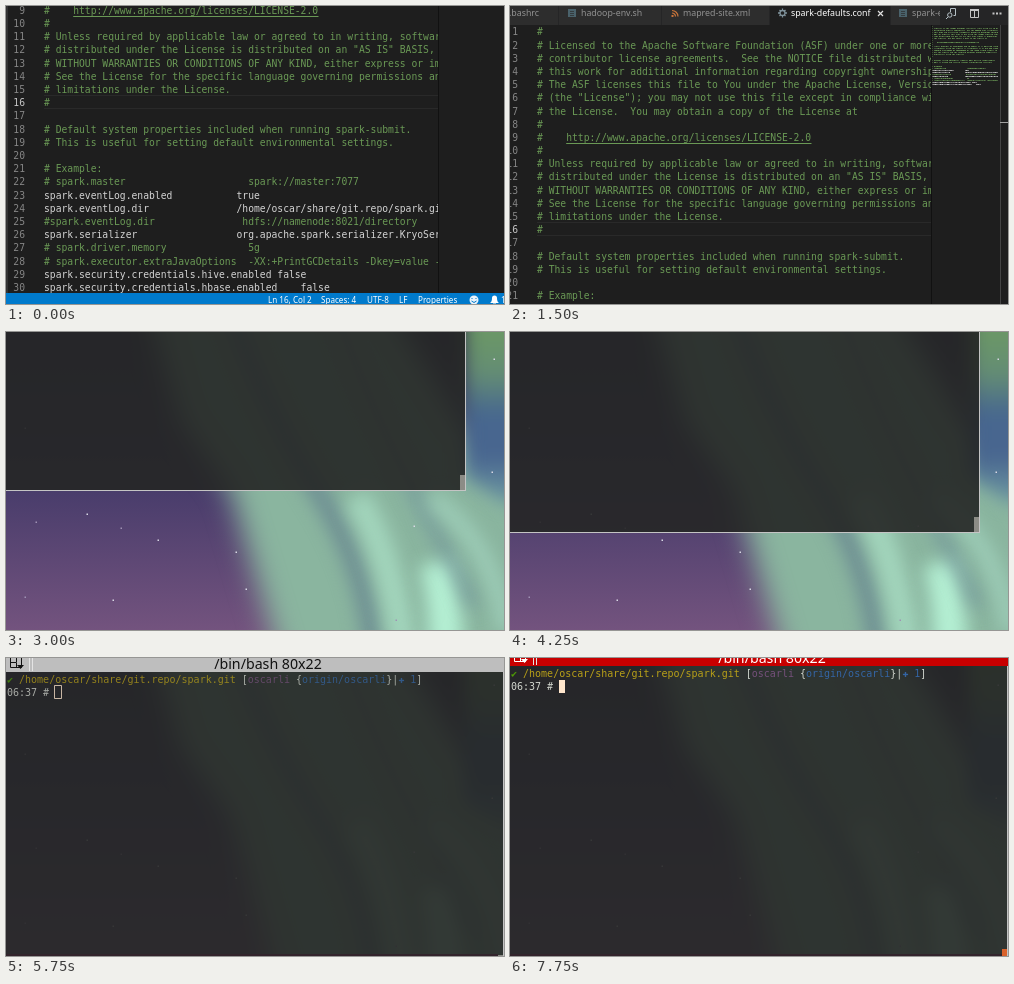
Recreate the animation shown at these times as an HTML page with a canvas. Size 498x298 px, loop 8000 ms.

```html
<!DOCTYPE html>
<html lang="en">
<head>
<meta charset="utf-8">
<title>Desktop</title>
<style>
html, body { margin: 0; width: 100%; height: 100%; overflow: hidden; background: #1e1e1e; }
canvas { display: block; }
</style>
</head>
<body>
<canvas id="stage" width="498" height="298"></canvas>
<script>
const W = 498, H = 298, STEP = 250, LOOP = 8000;
const MONO = '"DejaVu Sans Mono", monospace', SANS = '"Noto Sans", sans-serif';
const GREEN = '#6a9955', ROW = 13.19, CHAR = 5.84;
let ctx = document.getElementById('stage').getContext('2d');

const at = (key, value, col) => key.padEnd(col) + value;
const lines = [
  '#',
  '# Licensed to the Apache Software Foundation (ASF) under one or more',
  '# contributor license agreements.  See the NOTICE file distributed with',
  '# this work for additional information regarding copyright ownership.',
  '# The ASF licenses this file to You under the Apache License, Version 2.0',
  '# (the "License"); you may not use this file except in compliance with',
  '# the License.  You may obtain a copy of the License at',
  '#',
  '#    http://www.apache.org/licenses/LICENSE-2.0',
  '#',
  '# Unless required by applicable law or agreed to in writing, software',
  '# distributed under the License is distributed on an "AS IS" BASIS,',
  '# WITHOUT WARRANTIES OR CONDITIONS OF ANY KIND, either express or implied.',
  '# See the License for the specific language governing permissions and',
  '# limitations under the License.',
  '#',
  '',
  '# Default system properties included when running spark-submit.',
  '# This is useful for setting default environmental settings.',
  '',
  '# Example:',
  at('# spark.master', 'spark://master:7077', 35),
  at('spark.eventLog.enabled', 'true', 33),
  at('spark.eventLog.dir', '/home/oscar/share/git.repo/spark.git', 33),
  at('#spark.eventLog.dir', 'hdfs://namenode:8021/directory', 34),
  at('spark.serializer', 'org.apache.spark.serializer.KryoSerializer', 33),
  at('# spark.driver.memory', '5g', 35),
  at('# spark.executor.extraJavaOptions', '-XX:+PrintGCDetails -Dkey=value -Dnumbers="one two three"', 35),
  'spark.security.credentials.hive.enabled false',
  'spark.security.credentials.hbase.enabled    false'
];
const lineColor = s => s[0] === '#' ? GREEN : '#d4d4d4';

function rect(x, y, w, h, color) {
  ctx.fillStyle = color;
  ctx.fillRect(x, y, w, h);
}
function text(s, x, y, color, size, family = SANS, align = 'left') {
  ctx.font = `${size}px ${family}`;
  ctx.textAlign = align;
  ctx.fillStyle = color;
  ctx.fillText(s, x, y);
}
function path(d, color, width = 1) {
  ctx.strokeStyle = color;
  ctx.lineWidth = width;
  ctx.stroke(new Path2D(d));
}
function shape(d, color) {
  ctx.fillStyle = color;
  ctx.fill(new Path2D(d));
}
function fade(y0, y1, ...colors) {
  const g = ctx.createLinearGradient(0, y0, 0, y1);
  colors.forEach((c, i) => g.addColorStop(i / (colors.length - 1), c));
  return g;
}
function layer(w, h, draw) {
  const c = document.createElement('canvas'), main = ctx;
  c.width = w;
  c.height = h;
  ctx = c.getContext('2d');
  draw();
  ctx = main;
  return c;
}

const wallpaper = layer(W, H, () => {
  rect(0, 0, W, H, fade(0, H, '#2f2a4e', '#463b6a', '#73537e'));
  ctx.filter = 'blur(14px)';
  shape('M140-30 175 90 224 158 278 340H540V160L455 90 380-30Z', '#8ab59f');
  ctx.filter = 'blur(9px)';
  path('M225-20Q260 80 312 160T368 330', '#6c8c92', 18);
  path('M350 165Q385 220 398 320', '#a3d6bd', 26);
  path('M430 230Q440 265 440 320', '#b4efd3', 34);
  path('M330-20Q370 90 415 172T468 275', '#74989b', 11);
  path('M425 165Q490 215 500 300', '#9fcfba', 16);
  shape('M458-30H540V165L500 172 458 145Z', fade(0, 165, '#6b9766', '#648d74', '#47678f', '#48658f', '#6a94a0'));
  ctx.filter = 'none';
  const stars = [[81, 182], [230, 220], [240, 257], [107, 268], [152, 208], [408, 194],
    [488, 27], [486, 140], [19, 96], [30, 190], [19, 265], [390, 288], [115, 196]];
  stars.forEach(([x, y], i) => rect(x - .5, y - .5, 1.5, 1.5, i < 8 ? '#d8d8e4' : '#9f92b4'));
});

function fileIcon(x) {
  rect(x - 4, 34, 8, 8, '#4a626b');
  path(`M${x - 2} 36.500h4m-4 2h4m-4 2h4`, '#2d2d2d', .7);
}

function drawEditor(x, y, caret) {
  ctx.save();
  ctx.translate(x, y);
  rect(-57, 5, 555, 456, '#1e1e1e');
  rect(-57, 26, 48, 420, '#333333');

  // title bar
  rect(-57, 5, 555, 21, '#3a3a3a');
  text('Debug', 11, 18.3, '#d4d4d4', 8.7);
  text('Terminal', 49, 18.3, '#d4d4d4', 8.7);
  text('Help', 96, 18.3, '#d4d4d4', 8.7);
  text('spark-defaults.conf - share - Pretty Editor Desk [Superuser]', 271, 18.3, '#d4d4d4', 8.7, SANS, 'center');
  path('M415.500 15.500h7M447.500 12.500h7v7h-7zM477.500 12l7 7m0-7-7 7', '#d0d0d0');

  // tabs
  rect(-9, 26, 507, 24, '#252526');
  rect(-9, 26, 57, 24, '#2d2d2d');
  rect(49, 26, 102, 24, '#2d2d2d');
  rect(152, 26, 107, 24, '#2d2d2d');
  rect(260, 26, 120, 24, '#1e1e1e');
  rect(381, 26, 49, 24, '#2d2d2d');
  text('.bashrc', -1, 41, '#929292', 8.8);
  fileIcon(62);
  text('hadoop-env.sh', 71, 41, '#929292', 8.8);
  path('M162 35.500a6 6 0 0 1 6 6M162 38a3.500 3.500 0 0 1 3.500 3.500', '#c8743a', 1.2);
  rect(161.5, 40, 2, 2, '#c8743a');
  text('mapred-site.xml', 173, 41, '#929292', 8.8);
  path('M275 38a2.500 2.500 0 1 1-5 0 2.500 2.500 0 1 1 5 0M272.500 33.500v2m0 5v2M268 38h2m5 0h2M269.500 35l1 1m4 4 1 1m0-6-1 1m-4 4-1 1', '#7f929b', 1.3);
  text('spark-defaults.conf', 281, 41, '#ffffff', 8.8);
  path('M368 36l5 5m0-5-5 5', '#e0e0e0', 1.2);
  fileIcon(393);
  ctx.save();
  ctx.beginPath();
  ctx.rect(381, 26, 49, 24);
  ctx.clip();
  text('spark-env.sh', 402, 41, '#929292', 8.8);
  ctx.restore();
  path('M440.500 37v-3.500h5v7h-2M442 40a2.200 2.200 0 1 1-4.400 0 2.200 2.200 0 1 1 4.400 0M438 42l-2 2', '#b5c0c5');
  path('M460.500 34.500h8v8h-8zM464.500 34v8', '#c5c5c5');
  rect(460, 34, 9, 2, '#c5c5c5');
  for (let i = 0; i < 3; i++) rect(482.5 + i * 3.5, 37.5, 2, 2, '#c5c5c5');

  // text area
  const cur = 247;
  rect(27, cur, 394, 1, '#292929');
  rect(27, cur + 13, 394, 1, '#292929');
  ctx.save();
  ctx.beginPath();
  ctx.rect(-9, 50, 430, 395);
  ctx.clip();
  lines.forEach((s, i) => {
    const base = Math.round(60.4 + i * ROW);
    text(i + 1, 8, base, i === 15 ? '#c6c6c6' : '#858585', 9.7, MONO, 'right');
    text(s, 27, base, lineColor(s), 9.7, MONO);
  });
  rect(27 + 5 * CHAR, 168, 42 * CHAR, 1, GREEN);
  if (caret) rect(32, 248, 1, 13, '#d0d0c8');
  ctx.restore();

  // minimap and ruler
  rect(421, 50, 1, 395, '#111111');
  lines.forEach((s, i) => {
    for (let c = 0; c < Math.min(s.length, 66); c++) {
      if (s[c] === ' ') continue;
      ctx.globalAlpha = .4 + s.charCodeAt(c) % 5 * .12;
      rect(422 + c, 51 + i * 2, 1, 1, lineColor(s));
    }
  });
  ctx.globalAlpha = 1;
  rect(490, 50, 1, 395, '#444444');
  rect(490, 147, 8, 1, '#a0a0a0');

  // status bar
  rect(-57, 445, 555, 16, '#007acc');
  [['Ln 16, Col 2', 251], ['Spaces: 4', 304], ['UTF-8', 350], ['LF', 382], ['Properties', 401], ['1', 484]]
    .forEach(([s, left]) => text(s, left, 455, '#ffffff', 8.1));
  shape('M452.500 452a4.500 4.500 0 1 0 9 0a4.500 4.500 0 1 0-9 0', '#e8f2fa');
  path('M454.500 453q2.500 3 5 0M455 450v1m4-1v1', '#007acc');
  shape('M473 455q2-1 2-5a2.500 2.500 0 0 1 5 0q0 4 2 5zM476 455.500h3v1h-3z', '#ffffff');

  // grabbing hand
  const hand = 'M160 14q0-2 2-1v-2q1.500-2 3 0q1.500-2 3 0q1.500-1 2.500 .5v5l-2 4h-6l-2.500-4z';
  path(hand, '#000000', 2);
  shape(hand, '#ffffff');
  path('M164.500 11.500v3m3-3v3', '#888888', .7);
  ctx.restore();
}

function drawTerminal(x, y, focused) {
  ctx.save();
  ctx.translate(x, y);
  rect(-20, 8, 517, 298, 'rgba(37,38,37,.9)');
  rect(497, -10, 1, 316, '#c4c4c4');
  rect(-20, 306, 518, 1, '#c4c4c4');
  rect(492, 291, 5, 15, focused ? '#d9622b' : '#8c8c86');

  const ink = focused ? '#ffffff' : '#111111';
  rect(-20, -10, 518, 18, focused ? '#c80000' : '#bebebe');
  rect(-20, -10, 518, 1, '#777777');
  path('M4.500-6.500h11v10h-11zM4.500-1.500h6v5M10.500-6v4', ink);
  shape('M11 1h7l-3.500 4z', ink);
  rect(23, -9, 1, 16, '#e4e4e4');
  rect(26, -9, 1, 16, '#e4e4e4');
  text('/bin/bash 80x22', 262, 5, ink, 14.2, SANS, 'center');

  ctx.globalAlpha = focused ? 1 : .75;
  const plain = '#d3d7cf', blue = '#3465a4';
  let col = 0;
  for (const [s, color] of [['✔ ', '#4e9a06'], ['/home/oscar/share/git.repo/spark.git ', '#b8a018'],
    ['[', plain], ['oscarli ', '#75507b'], ['{', plain], ['origin/oscarli', blue], ['}|', plain],
    ['✚ 1', blue], [']', plain]]) {
    for (const c of s) text(c, 1 + 6.02 * col++, 19, color, 10, MONO);
  }
  text('06:37 #', 1, 32, plain, 10, MONO);
  if (focused) rect(49, 22, 6, 13, '#ffe6cc');
  else path('M48.500 21.500h7v13h-7z', '#ffe6cc');
  ctx.restore();
}

function drawBeam(x, y) {
  const d = `M${x - 3} ${y - 7.5}h2l1 1 1-1h2M${x} ${y - 7}v14M${x - 3} ${y + 7.5}h2l1-1 1 1h2`;
  path(d, '#000000', 2.4);
  path(d, '#ffffff', 1.2);
}

// window positions, one per step
const editorMoves = [[8, -126], [5, -94], [3, -63], [0, -31], [0, -20], [0, -10], [0, 0], [250, -6], [500, -8]];
function terminalAt(step) {
  const p = Math.min(Math.max((step - 16) / 4, 0), 1);
  const lift = Math.min(Math.max(step - 21, 0), 3) * 6;
  return [Math.round(-38 * (1 - p)), Math.round(-148 + 166 * p) - lift];
}

function draw(t) {
  const step = Math.floor(t / STEP);
  ctx.drawImage(wallpaper, 0, 0);
  if (step >= 20) {
    rect(0, 0, 331, 8, '#f7e5ea');
    rect(331, 0, 167, 8, '#e9e8e8');
    rect(164, 0, 1, 8, '#c8bcc0');
    rect(331, 0, 1, 8, '#c8bcc0');
  }
  drawTerminal(...terminalAt(step), step === 21 || step >= 25);
  if (step >= 20) rect(0, 296, 492, 2, '#33242c');
  if (step < 12) drawEditor(...(step < 3 ? [11, -158] : editorMoves[step - 3]), step % 4 === 1);
  if (step === 26) drawBeam(266.5, 69);
  if (step > 26 && step < 31) drawBeam(282.5, 104);
}

function tick() {
  draw(performance.now() % LOOP);
  requestAnimationFrame(tick);
}
tick();
</script>
</body>
</html>
```
